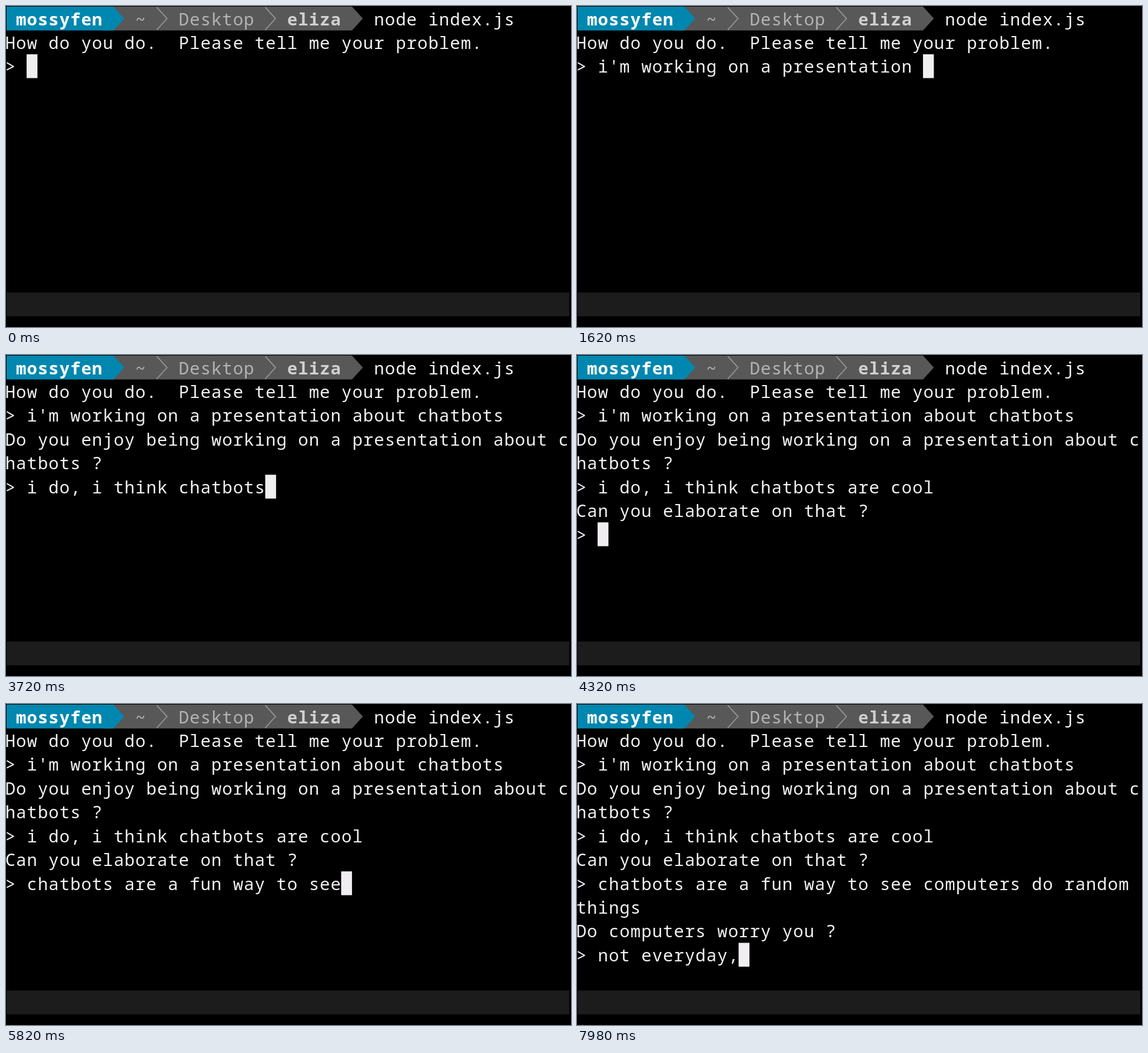
An HTML page with a canvas that plays this animation: 960x545 px, repeating every 8 s.

```html
<!DOCTYPE html>
<html lang="en">
<head>
<meta charset="utf-8">
<title>Terminal chat</title>
<style>
  html, body { margin: 0; width: 100%; height: 100%; overflow: hidden; background: #000; }
  canvas { display: block; }
</style>
</head>
<body>
<canvas id="stage" width="960" height="545"></canvas>
<script>
const ctx = document.getElementById('stage').getContext('2d');
const LOOP = 8000, STEP = 60;
const COLS = 52, CELL = 18.43, ROW = 40.44, LEFT = -1.87, TOP = 1.1, BASE = 31.4;
const FONT = '29px "Noto Sans Mono", "DejaVu Sans Mono", monospace';
const INK = '#f2f2f2', CURSOR = '#f0eef0', BLUE = '#0087af', GREY = '#585858';

// keys: [time, characters typed]; enter: when the reply appears
const turns = [
  { say: "i'm working on a presentation about chatbots",
    keys: [[0, 0], [1600, 30], [2360, 44]], enter: 2460,
    reply: 'Do you enjoy being working on a presentation about chatbots ?' },
  { say: 'i do, i think chatbots are cool',
    keys: [[2650, 0], [3700, 22], [4180, 31]], enter: 4320,
    reply: 'Can you elaborate on that ?' },
  { say: 'chatbots are a fun way to see computers do random things',
    keys: [[4420, 0], [4960, 10], [6700, 49], [7060, 56]], enter: 7160,
    reply: 'Do computers worry you ?' },
  { say: 'not everyday,',
    keys: [[7290, 0], [7550, 5], [7970, 13]], enter: Infinity }
];

const colX = col => LEFT + col * CELL;
const rowY = row => TOP + row * ROW;

function typedCount(keys, t) {
  let count = 0;
  for (let i = 1; i < keys.length; i++) {
    const [t0, n0] = keys[i - 1], [t1, n1] = keys[i];
    if (t >= t0) count = Math.floor(n0 + (n1 - n0) * Math.min(1, (t - t0) / (t1 - t0)));
  }
  return count;
}

// Each character is centred in its terminal cell
function write(text, col, row, color = INK, weight = 400) {
  ctx.font = `${weight} ${FONT}`;
  ctx.textAlign = 'center';
  ctx.fillStyle = color;
  [...text].forEach((ch, i) => {
    if (ch !== ' ') ctx.fillText(ch, colX(col + i + 0.5), rowY(row) + BASE);
  });
}

// Writes text wrapped at the terminal width and returns the number of rows
function writeWrapped(text, row) {
  const rows = Math.ceil(text.length / COLS);
  for (let i = 0; i < rows; i++) write(text.slice(i * COLS, (i + 1) * COLS), 0, row + i);
  return rows;
}

function segment(from, to, color) {
  const x0 = Math.max(1, colX(from)), x1 = colX(to), y = rowY(0);
  ctx.fillStyle = color;
  ctx.beginPath();
  ctx.moveTo(x0, y);
  ctx.lineTo(x1, y);
  ctx.lineTo(x1 + CELL, y + ROW / 2);
  ctx.lineTo(x1, y + ROW);
  ctx.lineTo(x0, y + ROW);
  ctx.fill();
}

function chevron(col) {
  const x = colX(col), y = rowY(0);
  ctx.strokeStyle = '#949494';
  ctx.lineWidth = 1.8;
  ctx.beginPath();
  ctx.moveTo(x, y + 1);
  ctx.lineTo(x + CELL - 1, y + ROW / 2);
  ctx.lineTo(x, y + ROW - 1);
  ctx.stroke();
}

function drawPrompt() {
  segment(9, 32, GREY);
  segment(0, 10, BLUE);
  chevron(14);
  chevron(24);
  write('mossyfen', 1, 0, '#fff', 700);
  write('~', 12, 0, '#b4b4b4');
  write('Desktop', 16, 0, '#b4b4b4');
  write('eliza', 26, 0, '#d0d0d0', 700);
  write('node index.js', 34, 0);
}

function drawChat(t) {
  let row = 2;
  write('How do you do.  Please tell me your problem.', 0, 1);
  for (const { say, keys, enter, reply } of turns) {
    const line = '> ' + say.slice(0, typedCount(keys, t));
    const rows = writeWrapped(line, row);
    if (t < enter) {
      ctx.fillStyle = CURSOR;
      ctx.fillRect(colX(line.length % COLS), rowY(row + Math.floor(line.length / COLS)), CELL, ROW);
      return;
    }
    row += rows;
    row += writeWrapped(reply, row);
  }
}

function draw(t) {
  ctx.fillStyle = '#000';
  ctx.fillRect(0, 0, 960, 545);
  ctx.fillStyle = '#1c1c1c';
  ctx.fillRect(1, rowY(12), 956, ROW);
  drawPrompt();
  drawChat(t);
}

const start = performance.now();
function tick() {
  const t = (performance.now() - start) % LOOP;
  draw(Math.floor(t / STEP) * STEP);
  requestAnimationFrame(tick);
}
tick();
</script>
</body>
</html>
```
